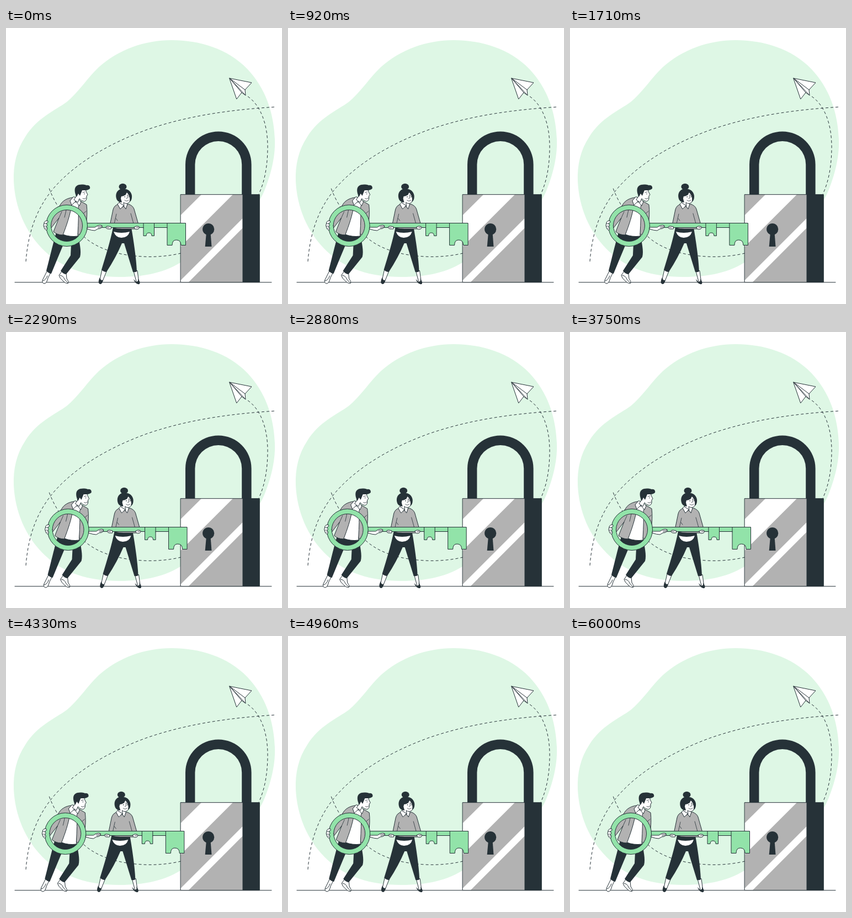
Recreate the animation shown at these times as an HTML page. Size 500 by 500 pixels, loop 6040 ms.

```html
<!DOCTYPE html>
<html lang="en">
<head>
<meta charset="utf-8">
<title>Key and padlock</title>
<style>
html, body { margin: 0; width: 100%; height: 100%; overflow: hidden; background: #fff; }
svg { display: block; width: 100vw; height: 100vh; }
.line { fill: none; stroke: #263238; stroke-width: 1; stroke-linecap: round; stroke-linejoin: round; }
.thin { stroke-width: .8; }
.dash { stroke-dasharray: 5 4; stroke-linecap: butt; }
.white { fill: #fff; }
.gray { fill: #b2b2b2; }
.green { fill: #92e3a9; }
.dark { fill: #263238; }
</style>
</head>
<body>
<svg viewBox="0 0 500 500">
  <path fill="#def7e5" d="M300 22C251 22 204 39 168 71C148 90 130 118 110 134C88 150 56 163 35 197C19 221 13 248 14 277C16 323 34 370 71 405C105 437 150 451 205 451C251 451 290 443 322 421C388 380 450 340 468 295C483 258 488 227 487 202C485 152 470 109 437 74C401 37 350 22 300 22Z"/>

  <path class="line dash" d="M36 423C40 371 55 325 90 286C131 241 192 207 256 184C332 158 409 148 488 143"/>
  <path class="line dash" d="M438 124C460 139 474 172 474 215C474 245 470 275 458 301"/>
  <path class="line dash" d="M317 408C292 414 263 416 234 413C192 409 160 396 140 377C114 352 91 326 78 290"/>

  <g class="line">
    <path class="white" d="M405 91L445 99L433 112L434 122L427 117L418 128.500Z"/>
    <path d="M433 112L405 91L427 117M405 91L434 122"/>
  </g>

  <path class="line" d="M16 460.700H481"/>

  <g id="lock">
    <path class="dark" d="M325 302V247.300A59.800 59.800 0 0 1 444.600 247.300V302H427.200V247.300A42.400 42.400 0 0 0 342.400 247.300V302Z"/>
    <path class="gray" d="M316.500 301.700H429V460.700H316.500Z"/>
    <path class="white" d="M354 301.700H411L316.500 396V339ZM428.500 345V362.500L330.500 460.700H316.500V457Z"/>
    <path class="dark" d="M428.500 301.700H459.300V460.700H428.500Z"/>
    <path class="line" d="M316.500 301.700H459.300V460.700H316.500Z"/>
    <circle class="dark" cx="366.700" cy="364.500" r="10.600"/>
    <path class="dark" d="M363 370H370.500L372.500 396H360.700Z"/>
  </g>

  <g id="carriers">
    <g id="man">
      <g class="line">
        <path class="white" d="M74 441L66 457Q65 463 70 463Q74 462 76 453L81 443Z"/>
        <path class="white" d="M101 441L96 448Q97 453 103 458Q109 464 113 462Q114 459 110 454L109 444Z"/>
        <path d="M67 458Q72 457 75 449M98 448Q104 449 106 455L112 462"/>
      </g>
      <path class="dark" d="M92 367C86 387 78 421 73 440Q78 445 82 445C89 428 96 411 104 392L118 392L117 412L99 440Q104 446 109 446L134 415C137 404 133 389 130 371Z"/>
      <g class="line">
        <path class="white" d="M118 316L136 314L130 377Q116 379 103 374Z"/>
        <path class="gray" d="M121 307C111 308 102 313 98 321L75 349Q75 357 82 362L96 344L86 369Q93 375 103 375C110 357 116 339 118 325Z"/>
        <path class="gray" d="M134 313L146 320Q148 336 145 357L149 362L140 374L130 374Q132 341 131 326Z"/>
        <path class="thin" d="M96 344L101 333M109 330L106 343M145 332L139 337M143 354L137 345"/>
        <path class="white" d="M122 306L116 313L119 321L126 314L133 322L136 315L131 309Z"/>
        <path class="white" d="M130 296L144 292Q145 297 148 302Q147 304 146 304L146 309Q145 314 141 314Q136 313 133 309L130 316L123 311Q128 306 128 300Z"/>
        <path class="thin" d="M139 309Q142 311 145 308M139 298L143 297"/>
      </g>
      <path class="dark" d="M128 306C124 299 123 289 128 286C132 283 140 283 146 285C151 284 153 288 152 291C148 295 142 294 138 294L136 299L134 304L131 300Z"/>
      <circle class="dark" cx="142" cy="300.500" r=".8"/>
    </g>

    <g id="woman">
      <g class="line">
        <path class="white" d="M174 438L170 456L174 461L182 441ZM231 440L236 459L241 462L238 440Z"/>
      </g>
      <path class="dark" d="M170 452Q167 458 168 462Q171 466 174 462L176 456Q172 459 170 452ZM231 455Q233 462 239 464Q244 465 242 459L239 454Q240 460 236 460Z"/>
      <path class="dark" d="M194 361H227C231 385 236 416 237 441Q234 443 230 442L214 390H210Q199 416 182 442Q177 442 173 438C181 412 189 386 194 361Z"/>
      <path class="white" d="M195 369Q209 373 224 369Q221 380 209 380Q199 380 195 369Z"/>
      <g class="line">
        <path class="gray" d="M204 319Q196 321 194 329L188 358Q194 364 210 364H238L240 356L232 328Q230 322 222 319L212 324Z"/>
        <path class="thin" d="M200 337L196 355M226 336L231 354M199 345L202 349"/>
        <path class="white" d="M206 315L202 319L207 328L213 322L217 328L220 319L216 315Z"/>
        <path class="white" d="M207 304Q213 303 219 296Q225 301 225 307Q226 317 219 318Q215 318 213 316L214 322L206 317Z"/>
        <path class="thin" d="M215 312Q218 315 222 312M220 302V308L218 309M221 303L224 303M213 303L217 302"/>
      </g>
      <ellipse class="dark" cx="211.500" cy="287.500" rx="7" ry="5.800"/>
      <path class="dark" d="M200 309C198 302 200 295 207 292H218C225 294 229 301 228 307Q228 312 224 315Q226 305 219 298Q216 305 209 305L208 309L210 316C205 316 201 313 200 309Z"/>
      <path class="dark" d="M214.500 305h1.500v1.500h-1.500zM222 305h1.500v1.500h-1.500z"/>
    </g>

    <g id="key" class="line">
      <path class="green" d="M145 353.500H325.500V393.500H317Q317 384 308.500 384Q301 384 301 393.500H292V361.500H268.500V376.500H264Q264 371 259 371Q254 371 254 376.500H249V361.500H145Z"/>
      <path d="M249 353.500V362M268.500 353.500V362M292 353.500V362"/>
      <path class="green" fill-rule="evenodd" d="M72.500 358a37.500 37.500 0 0 1 75 0a37.500 37.500 0 0 1 -75 0ZM81.500 358a28.500 28.500 0 0 0 57 0a28.500 28.500 0 0 0 -57 0Z"/>
    </g>

    <g id="hands" class="line">
      <path class="white" d="M75 349Q69 349 69 354Q67 358 69 361Q70 366 74 366L75 362L73 360L75 357L73 354L76 352Z"/>
      <path class="thin" d="M69 354L74 355M69 359L74 359M71 363L74 362"/>
      <path class="white" d="M148 361L161 361L166 358Q171 356 174 358V361Q171 364 166 364L161 367Q155 367 147 364Z"/>
      <path class="thin" d="M166 360L174 359M167 362L173 361"/>
      <path class="white" d="M190 360L185 359Q180 359 181 362Q183 365 190 364Z"/>
      <path class="white" d="M232 361L236 359Q242 359 242 361Q241 365 236 365Q232 364 232 361Z"/>
      <path class="thin" d="M182 361L187 362M236 362L241 361"/>
    </g>
  </g>
</svg>
<script>
const carriers = document.getElementById('carriers');
const LOOP = 6040, SHAKE = 6000, FPS = 24;
const offsets = [0, -1, 2, -4, 4, -4, 4, -4, 2, -1, 0];

function shakeAt(ms) {
  const pos = Math.min(ms / SHAKE, 1) * (offsets.length - 1);
  const i = Math.min(Math.floor(pos), offsets.length - 2);
  return offsets[i] + (offsets[i + 1] - offsets[i]) * (pos - i);
}

function draw(now) {
  const step = Math.floor((now % LOOP) * FPS / 1000 + 0.15);
  carriers.setAttribute('transform', `translate(${shakeAt(step * 1000 / FPS).toFixed(3)} 0)`);
}

function tick() {
  draw(performance.now());
  requestAnimationFrame(tick);
}
tick();
</script>
</body>
</html>
```
